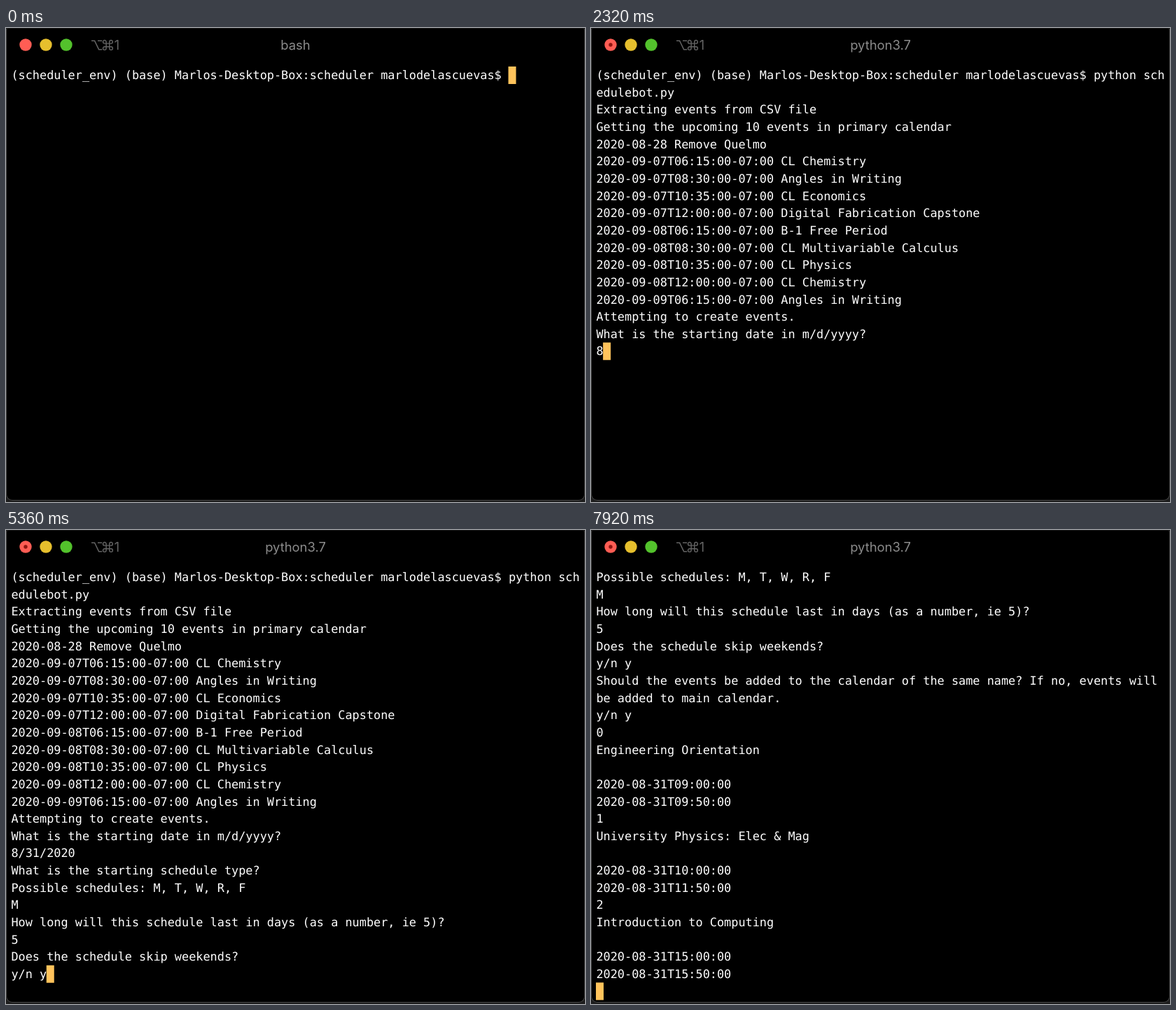
Animation, 827 px wide and 677 px high, one loop 8 s. Source, as an HTML page:

```html
<!DOCTYPE html>
<html lang="en">
<head>
<meta charset="utf-8">
<title>Terminal</title>
<style>
  html, body { margin: 0; width: 100%; height: 100%; overflow: hidden; background: #1c1c1c; }
  #win {
    position: absolute; left: 0; top: 0; width: 827px; height: 675px; box-sizing: border-box;
    background: #000; border: 1px solid #474747; border-top-color: #161616; border-radius: 3px 3px 9px 9px;
  }
  #bar { position: absolute; left: 0; top: 0; }
  #title {
    position: absolute; left: 0; top: 12px; width: 827px; text-align: center;
    font: 18.4px/25px Inter, sans-serif; color: #8b8b8b;
  }
  #screen, #cursor { position: absolute; left: 7.4px; top: 55.2px; }
  #screen {
    margin: 0; white-space: pre; color: #fff; text-rendering: geometricPrecision;
    font: 16.86px/24.64px "DejaVu Sans Mono", monospace;
    font-variant-ligatures: none;
  }
  #cursor { width: 10.2px; height: 24.6px; background: #ffc35b; }
</style>
</head>
<body>
<div id="win"></div>
<svg id="bar" width="827" height="50">
  <circle cx="28" cy="24" r="8.7" fill="#ff5d54"/>
  <circle id="busy" cx="28" cy="24" r="2.7" fill="#8e1510"/>
  <circle cx="57" cy="24" r="8.7" fill="#e6bf2d"/>
  <circle cx="86" cy="24" r="8.7" fill="#53c22c"/>
  <g fill="none" stroke="#626262" stroke-width="1.5">
    <path d="M122 18.3h4.6l6 12.4h4.6M131 18.3h6.2"/>
    <path transform="translate(136.2 15.2) scale(.77)" stroke-width="1.9"
      d="M18 3a3 3 0 0 0-3 3v12a3 3 0 1 0 3-3H6a3 3 0 1 0 3 3V6a3 3 0 1 0-3 3h12a3 3 0 0 0 0-6z"/>
  </g>
  <text x="154.5" y="31" font-family="Inter, sans-serif" font-size="19" fill="#626262">1</text>
</svg>
<div id="title"></div>
<pre id="screen"></pre>
<div id="cursor"></div>
<script>
const LOOP = 8000, COLS = 80, ROWS = 25, CELL_W = 10.15, CELL_H = 24.64, JOB_START = 1520;
const $ = id => document.getElementById(id);

// One keystroke every 80 ms.
const type = (start, text) => [...text].map((key, i) => [start + i * 80, key]);
const entry = (n, name, from, to) =>
  `${n}\n${name}\n\n2020-08-31T${from}:00\n2020-08-31T${to}:00\n`;

const agenda = `2020-08-28 Remove Quelmo
2020-09-07T06:15:00-07:00 CL Chemistry
2020-09-07T08:30:00-07:00 Angles in Writing
2020-09-07T10:35:00-07:00 CL Economics
2020-09-07T12:00:00-07:00 Digital Fabrication Capstone
2020-09-08T06:15:00-07:00 B-1 Free Period
2020-09-08T08:30:00-07:00 CL Multivariable Calculus
2020-09-08T10:35:00-07:00 CL Physics
2020-09-08T12:00:00-07:00 CL Chemistry
2020-09-09T06:15:00-07:00 Angles in Writing
Attempting to create events.
What is the starting date in m/d/yyyy?
`;

const output = [
  [0, "(scheduler_env) (base) Marlos-Desktop-Box:scheduler marlodelascuevas$ "],
  ...type(160, "python sche"),
  [1040, "du"], [1120, "leb"], [1200, "ot."], [1280, "py"], [1360, "\n"],
  [1600, "Extracting events from CSV file\n"],
  [1680, "Getting the upcoming 10 events in primary calendar\n"],
  [1840, agenda],
  [2320, "8"],
  ...type(2480, "/31/2020"),
  [3120, "\nWhat is the starting schedule type?\nPossible schedules: M, T, W, R, F\n"],
  [3600, "M"],
  [3840, "\nHow long will this schedule last in days (as a number, ie 5)?\n"],
  [4480, "5"],
  [4640, "\nDoes the schedule skip weekends?\ny/n "],
  [5200, "y"],
  [5520, "\nShould the events be added to the calendar of the same name? If no, events will\nbe added to main calendar.\ny/n "],
  [6720, "y"],
  [7520, "\n" + entry(0, "Engineering Orientation", "09:00", "09:50")],
  [7680, entry(1, "University Physics: Elec & Mag", "10:00", "11:50")],
  [7840, entry(2, "Introduction to Computing", "15:00", "15:50")]
];

function wrap(line) {
  const rows = [];
  for (let i = 0; i <= line.length; i += COLS) {
    if (i === 0 || i < line.length || line.length === COLS) rows.push(line.slice(i, i + COLS));
  }
  return rows;
}

let shown = -1;
function draw(t) {
  const count = output.filter(([at]) => at <= t).length;
  const busy = t >= JOB_START;
  $("busy").style.display = busy ? "" : "none";
  $("title").textContent = busy ? "python3.7" : "bash";
  if (count === shown) return;
  shown = count;
  const text = output.slice(0, count).map(step => step[1]).join("");
  const rows = text.split("\n").flatMap(wrap).slice(-ROWS);
  const x = rows[rows.length - 1].length * CELL_W, y = (rows.length - 1) * CELL_H;
  $("screen").textContent = rows.join("\n");
  $("cursor").style.transform = `translate(${x}px, ${y}px)`;
}

const begin = performance.now();
function tick() {
  draw((performance.now() - begin) % LOOP);
  requestAnimationFrame(tick);
}
tick();
</script>
</body>
</html>
```
